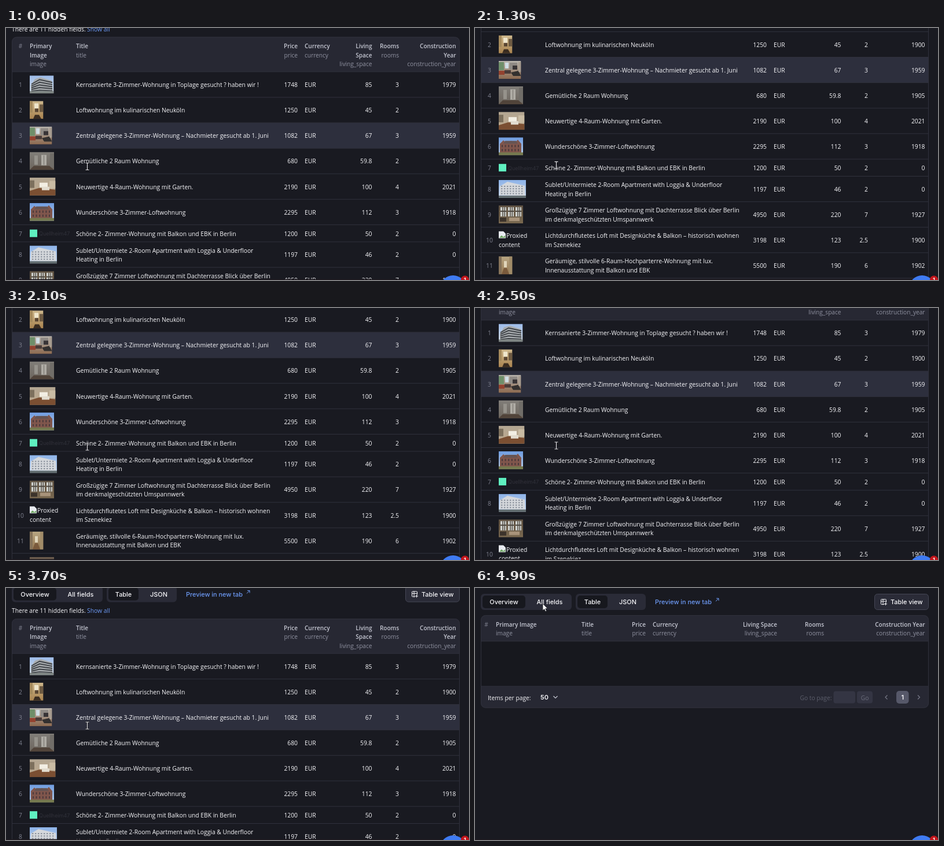
Animation of 800x436 px, one loop 5000 ms. Source, as an HTML page with a canvas:

```html
<!DOCTYPE html>
<html lang="de">
<head>
<meta charset="utf-8">
<title>Table</title>
<style>
html, body { margin: 0; width: 100%; height: 100%; overflow: hidden; background: #191a21; }
canvas { display: block; }
</style>
</head>
<body>
<canvas id="stage" width="800" height="436"></canvas>
<script>
const ctx = document.getElementById('stage').getContext('2d');
const LOOP = 5000, STEP = 100;
const BODY = '"Open Sans", "Noto Sans", sans-serif';
const UI = 'Inter, Roboto, sans-serif';
const C = {
  page: '#191a21', panel: '#272833', line: '#30313c', hover: '#2d2f3d',
  text: '#f8f8fb', head: '#c6c8d3', dim: '#9193a2', num: '#7f818f',
  link: '#6d9af5', group: '#2a2b37', pill: '#17181e', faint: '#5c5e6b'
};
const F = {
  row: '500 10.3px ' + BODY, sub: '10.15px ' + BODY, head: '600 10px ' + BODY,
  ui: '500 10.9px ' + UI, strong: '600 10.9px ' + UI
};

const ROWS_TOP = 126.8, ROW = 44.1;
const rows = [
  ['Kernsanierte 3-Zimmer-Wohnung in Toplage gesucht ? haben wir !', 1748, 85, 3, 1979],
  ['Loftwohnung im kulinarischen Neuköln', 1250, 45, 2, 1900],
  ['Zentral gelegene 3-Zimmer-Wohnung – Nachmieter gesucht ab 1. Juni', 1082, 67, 3, 1959],
  ['Gemütliche 2 Raum Wohnung', 680, 59.8, 2, 1905],
  ['Neuwertige 4-Raum-Wohnung mit Garten.', 2190, 100, 4, 2021],
  ['Wunderschöne 3-Zimmer-Loftwohnung', 2295, 112, 3, 1918],
  ['Schöne 2- Zimmer-Wohnung mit Balkon und EBK in Berlin', 1200, 50, 2, 0],
  ['Sublet/Untermiete 2-Room Apartment with Loggia & Underfloor|Heating in Berlin', 1197, 46, 2, 0],
  ['Großzügige 7 Zimmer Loftwohnung mit Dachterrasse Blick über Berlin|im denkmalgeschützten Umspannwerk', 4950, 220, 7, 1927],
  ['Lichtdurchflutetes Loft mit Designküche & Balkon – historisch wohnen|im Szenekiez', 3198, 123, 2.5, 1900],
  ['Geräumige, stilvolle 6-Raum-Hochparterre-Wohnung mit lux.|Innenausstattung mit Balkon und EBK', 5500, 190, 6, 1902],
  null
];
let edge = ROWS_TOP;
const tops = rows.map((r, i) => {
  const y = edge;
  edge += i === 6 ? 29.6 : ROW;
  return y;
});

// label lines, key, x, align
const wideCols = [
  ['Primary|Image', 'image', 41, 'left'], ['Title', 'title', 121, 'left'],
  ['Price', 'price', 504, 'right'], ['Currency', 'currency', 516, 'left'],
  ['Living|Space', 'living_space', 632.5, 'right'], ['Rooms', 'rooms', 679, 'right'],
  ['Construction|Year', 'construction_year', 777.5, 'right']
];
const emptyX = [36, 184, 295, 307, 522, 603, 777.5];
const emptyCols = wideCols.map(([label, key, , align], i) => [label.replace('|', ' '), key, emptyX[i], align]);

function text(s, x, mid, font, color, align = 'left') {
  ctx.font = font;
  ctx.fillStyle = color;
  ctx.textAlign = align;
  ctx.fillText(s, x, mid + 4);
}
function lines(s, x, mid, font, color) {
  const parts = s.split('|');
  parts.forEach((p, i) => text(p, x, mid + (i - (parts.length - 1) / 2) * 15.6, font, color));
}
function rect(x, y, w, h, color) {
  ctx.fillStyle = color;
  ctx.fillRect(x, y, w, h);
}
function box(x, y, w, h, r, fill, stroke) {
  ctx.beginPath();
  ctx.roundRect(x, y, w, h, r);
  if (fill) { ctx.fillStyle = fill; ctx.fill(); }
  if (stroke) { ctx.strokeStyle = stroke; ctx.lineWidth = 1; ctx.stroke(); }
}
function poly(points, fill, stroke, width = 1) {
  ctx.beginPath();
  points.forEach(([x, y]) => ctx.lineTo(x, y));
  if (fill) { ctx.closePath(); ctx.fillStyle = fill; ctx.fill(); }
  if (stroke) { ctx.strokeStyle = stroke; ctx.lineWidth = width; ctx.stroke(); }
}
function disc(x, y, r, color) {
  ctx.beginPath();
  ctx.arc(x, y, r, 0, 7);
  ctx.fillStyle = color;
  ctx.fill();
}

// Thumbnails, drawn in a box of w by 31
function backdrop(w, top, bottom) {
  const g = ctx.createLinearGradient(0, 0, 0, 31);
  g.addColorStop(0, top);
  g.addColorStop(1, bottom);
  rect(0, 0, w, 31, g);
}
const thumbs = {
  0: [41.5, w => {
    backdrop(w, '#9dbbe8', '#d3dde6');
    poly([[2, 17], [9, 6], [19, 3], [38, 9], [40, 28], [2, 27]], '#a9adb0');
    for (let i = 0; i < 5; i++)
      poly([[3, 15 + i * 3], [17, 7 + i * 4.6], [39, 12 + i * 3.6]], null, '#3d4146', 1.9);
    rect(0, 27, w, 4, '#7d8482');
  }],
  1: [23.5, w => {
    backdrop(w, '#cdb78c', '#a9834f');
    rect(0, 0, 5, 20, '#a58a5c');
    rect(8, 4, 7, 9, '#efe6cc');
    rect(17, 6, 6.5, 13, '#6d5a42');
    rect(9, 13, 6, 6, '#5a4632');
    poly([[6, 31], [9, 24], [16, 24], [20, 31]], '#3a2c20');
  }],
  2: [38.5, w => {
    backdrop(w, '#b9b5ae', '#8d6a50');
    rect(0, 2, 9, 14, '#6f8f6a');
    rect(11, 3, 6, 10, '#cfdde4');
    rect(19, 3, 13, 12, '#8e8984');
    rect(24, 8, 8, 7, '#383436');
    rect(0, 17, 10, 7, '#93422f');
    rect(10, 16, 11, 6, '#4a3c39');
    poly([[21, 20], [34, 17], [38.5, 26], [25, 26]], '#33302f');
    rect(34, 2, 4.5, 17, '#a79c90');
  }],
  3: [42, w => {
    backdrop(w, '#817e79', '#6d665e');
    rect(8, 6, 6, 16, '#95928b');
    rect(20, 5, 9, 18, '#aeaba4');
    rect(24, 6, 1, 16, '#77736d');
    rect(35, 2, 7, 25, '#706d68');
    poly([[0, 31], [7, 24], [34, 24], [42, 31]], '#51443a');
  }],
  4: [44.5, w => {
    backdrop(w, '#b3a692', '#bda98d');
    rect(0, 5, 8, 13, '#7d705d');
    rect(17, 9, 14, 8, '#f2eee3');
    rect(34, 6, 10.5, 13, '#c9bba3');
    poly([[0, 31], [0, 23], [16, 18], [44.5, 21], [44.5, 31]], '#7b4f32');
    rect(21, 16, 13, 6, '#e2dccf');
  }],
  5: [42, w => {
    backdrop(w, '#6f9ce0', '#b8cfe9');
    poly([[2, 28], [2, 11], [8, 5], [14, 10], [21, 6], [28, 9], [33, 4], [39, 11], [39, 28]], '#80564c');
    poly([[8, 11], [11, 6], [30, 6], [33, 11]], '#665453');
    for (let i = 0; i < 12; i++)
      rect(5 + i % 6 * 5.6, 13 + (i / 6 | 0) * 7, 2, 4, '#4a3a3c');
    rect(0, 26, w, 5, '#75794f');
  }],
  7: [47, w => {
    backdrop(w, '#8cb2e8', '#cbdaec');
    poly([[2, 11], [15, 3], [45, 10], [45, 27], [2, 26]], '#d5d8dc');
    for (let i = 0; i < 32; i++)
      rect(4 + i % 8 * 5, 10 + (i / 8 | 0) * 4.2, 2.4, 2, '#89909b');
    rect(0, 27, w, 4, '#626d70');
  }],
  8: [42, w => {
    backdrop(w, '#5f5243', '#79684f');
    for (let i = 0; i < 3; i++) {
      const x = 3 + i * 13;
      rect(x, 3, 10, 16, '#cfd1cd');
      for (let k = 1; k < 3; k++) rect(x + k * 3.3, 3, 1.4, 16, '#4b453d');
      rect(x, 9, 10, 2, '#4b453d');
    }
    rect(2, 21, 11, 7, '#3c332b');
    rect(18, 21, 18, 6, '#a8937a');
  }],
  10: [23.5, w => {
    backdrop(w, '#b8a683', '#947650');
    rect(0, 0, 5, 31, '#86735a');
    rect(9, 8, 5, 11, '#e0d5ba');
    rect(18, 0, 5.5, 31, '#a18c69');
    poly([[5, 31], [9, 20], [14, 20], [18, 31]], '#7a5a3c');
  }],
  11: [42, w => backdrop(w, '#6c5c4e', '#544639')]
};

function picture(i, mid) {
  if (i === 6) {
    rect(41, mid - 6.5, 13, 13, '#5ff0c0');
    text('Quellheim47', 57, mid, '9px ' + UI, '#30313a');
  } else if (i === 9) {
    poly([[41, mid - 15], [49, mid - 15], [53, mid - 11], [53, mid - 3], [41, mid - 3]], '#e8ebf0');
    poly([[42, mid - 4], [46, mid - 8], [49, mid - 5], [52, mid - 8], [52, mid - 4]], '#6aa55c');
    text('Proxied', 54, mid - 7.8, F.row, C.text);
    text('content', 41, mid + 7.8, F.row, C.text);
  } else {
    const [w, paint] = thumbs[i];
    ctx.save();
    ctx.translate(41, mid - 15.6);
    ctx.beginPath();
    ctx.rect(0, 0, w, 31);
    ctx.clip();
    paint(w);
    ctx.restore();
  }
}

function toolbar() {
  box(10, 10, 157, 28, 6, C.group);
  box(13, 13, 74, 22, 5, C.pill);
  text('Overview', 50, 24, F.ui, C.text, 'center');
  text('All fields', 129, 24, F.ui, C.text, 'center');
  box(174, 10, 121, 28, 6, C.group);
  box(177, 13, 52, 22, 5, C.pill);
  text('Table', 203, 24, F.ui, C.text, 'center');
  text('JSON', 264, 24, F.ui, C.text, 'center');
  text('Preview in new tab', 311, 24, F.ui, C.link);
  poly([[416, 23], [421, 18]], null, C.link);
  poly([[417, 18], [421, 18], [421, 22]], null, C.link);
  box(690.5, 10.5, 93, 27, 5, C.group, '#454755');
  box(701.5, 19.5, 9, 9, 1, null, C.text);
  poly([[701, 23], [711, 23]], null, C.text);
  poly([[705, 19], [705, 29]], null, C.text);
  rect(707, 25, 5, 5, C.group);
  poly([[709.5, 25], [709.5, 30]], null, C.text);
  poly([[707, 27.5], [712, 27.5]], null, C.text);
  text('Table view', 718, 24, F.ui, C.text);
}

function header(cols, y, numX) {
  text('#', numX, y, F.sub, C.num, 'center');
  for (const [label, key, x, align] of cols) {
    const parts = label.split('|');
    parts.forEach((p, i) => text(p, x, y + i * 15.6, F.head, C.head, align));
    text(key, x, y + parts.length * 15.6, F.sub, C.dim, align);
  }
}

function fullTable(hover) {
  text('There are 11 hidden fields.', 10, 52.8, F.row, C.text);
  text('Show all', 140, 52.8, F.row, C.link);
  box(10, 66.5, 774, ROWS_TOP - 66.5, [8, 8, 0, 0], C.panel);
  header(wideCols, 82, 25);
  rows.forEach((r, i) => {
    const y = tops[i], mid = (y + (tops[i + 1] ?? edge)) / 2;
    if (i === hover) rect(10, y, 774, ROW, C.hover);
    rect(10, y - 0.5, 774, 1, C.line);
    picture(i, mid);
    if (!r) return;
    const [title, price, space, rooms, year] = r;
    const cell = (s, x) => text(s, x, mid + 0.3, F.row, C.text, 'right');
    text(i + 1, 25, mid + 0.3, F.row, C.num, 'center');
    lines(title, 121, mid + 0.3, F.row, C.text);
    cell(price, 504);
    text('EUR', 516, mid + 0.3, F.row, C.text);
    cell(space, 632.5);
    cell(rooms, 679);
    cell(year, 777.5);
  });
  box(10.5, 67, 773, 900, 8, null, C.line);
}

function emptyTable() {
  box(10, 47, 774, 160.5, 8, C.panel);
  rect(10, 92, 774, 78, C.pill);
  rect(10, 91.5, 774, 1, C.line);
  rect(10, 169.5, 774, 1, C.line);
  box(10.5, 47.5, 773, 159.5, 8, null, C.line);
  header(emptyCols, 62.8, 19.5);
  text('Items per page:', 22, 189.5, F.row, C.text);
  text('50', 113, 189, F.strong, C.text);
  poly([[135.5, 187], [139, 190.5], [142.5, 187]], null, C.head, 1.2);
  text('Go to page:', 616.5, 189.5, F.row, C.faint, 'right');
  box(619.5, 178.5, 37.5, 21, 4, '#343543');
  box(660, 178.5, 27, 21, 4, '#343543');
  text('Go', 673.5, 189.5, F.row, '#6b6d7b', 'center');
  poly([[712.5, 185.5], [709, 189], [712.5, 192.5]], null, '#777987', 1.2);
  box(728, 178, 21.5, 22, 5, '#565869');
  text('1', 738.7, 189, F.strong, C.text, 'center');
  poly([[765, 185.5], [768.5, 189], [765, 192.5]], null, '#777987', 1.2);
}

function bubble() {
  disc(772.5, 450.5, 22.5, '#3f7bf2');
  disc(793, 435.5, 7, '#c4161c');
  text('1', 793, 435, '700 9px ' + UI, '#fff', 'center');
}

function beam(x, y) {
  const shape = [[x - 3, y - 6], [x + 3, y - 6], [x, y - 6], [x, y + 6], [x - 3, y + 6], [x + 3, y + 6]];
  poly(shape, null, '#0b0b0e', 2.4);
  poly(shape, null, '#e9e9ee', 1.2);
}
function arrow(x, y) {
  const shape = [[0, 0], [0, 12], [2.8, 9.6], [4.6, 13.6], [6.6, 12.7], [4.8, 8.8], [8.4, 8.6]];
  poly(shape.map(([a, b]) => [x + a, y + b]), '#fff', '#17181e', 0.8);
}

// Cubic through [time, value] pairs, flat at turning points
function curve(keys, t) {
  const last = keys.length - 1;
  if (t >= keys[last][0]) return keys[last][1];
  const slope = i => (keys[i + 1][1] - keys[i][1]) / (keys[i + 1][0] - keys[i][0]);
  const tangent = i => {
    if (i === 0) return slope(0);
    if (i === last) return 0;
    const a = slope(i - 1), b = slope(i);
    return a * b <= 0 ? 0 : 2 * a * b / (a + b);
  };
  let i = 0;
  while (t >= keys[i + 1][0]) i++;
  const h = keys[i + 1][0] - keys[i][0], u = (t - keys[i][0]) / h, v = 1 - u;
  return keys[i][1] * (1 + 2 * u) * v * v + keys[i + 1][1] * (3 - 2 * u) * u * u
    + h * u * v * (tangent(i) * v - tangent(i + 1) * u);
}
const scrollKeys = [[0, 51], [800, 85.1], [1300, 164.5], [1700, 177], [2100, 173],
  [2500, 105.8], [3000, 47], [3700, 13.5], [4000, 0]];
const mouseX = [[0, 140.5], [4000, 140.5], [4300, 128], [4700, 117]];
const mouseY = [[0, 239.5], [800, 237.8], [1300, 237.3], [2100, 240], [2500, 238],
  [4000, 238], [4300, 60], [4700, 27]];

function draw(t) {
  const scroll = curve(scrollKeys, t), x = curve(mouseX, t), y = curve(mouseY, t);
  let hover = 2;
  if (t > 4000) hover = y < ROWS_TOP ? -1 : Math.floor((y - ROWS_TOP) / ROW);
  rect(0, 0, 800, 436, C.page);
  ctx.save();
  ctx.translate(0, -scroll);
  toolbar();
  if (t < 4900) fullTable(hover);
  else emptyTable();
  ctx.restore();
  rect(0, 434.5, 800, 1.5, '#1e1a20');
  bubble();
  (y < 66 ? arrow : beam)(x, y);
}

const start = performance.now();
function tick() {
  const t = (performance.now() - start) % LOOP;
  draw(Math.floor(t / STEP) * STEP);
  requestAnimationFrame(tick);
}
tick();
</script>
</body>
</html>
```
